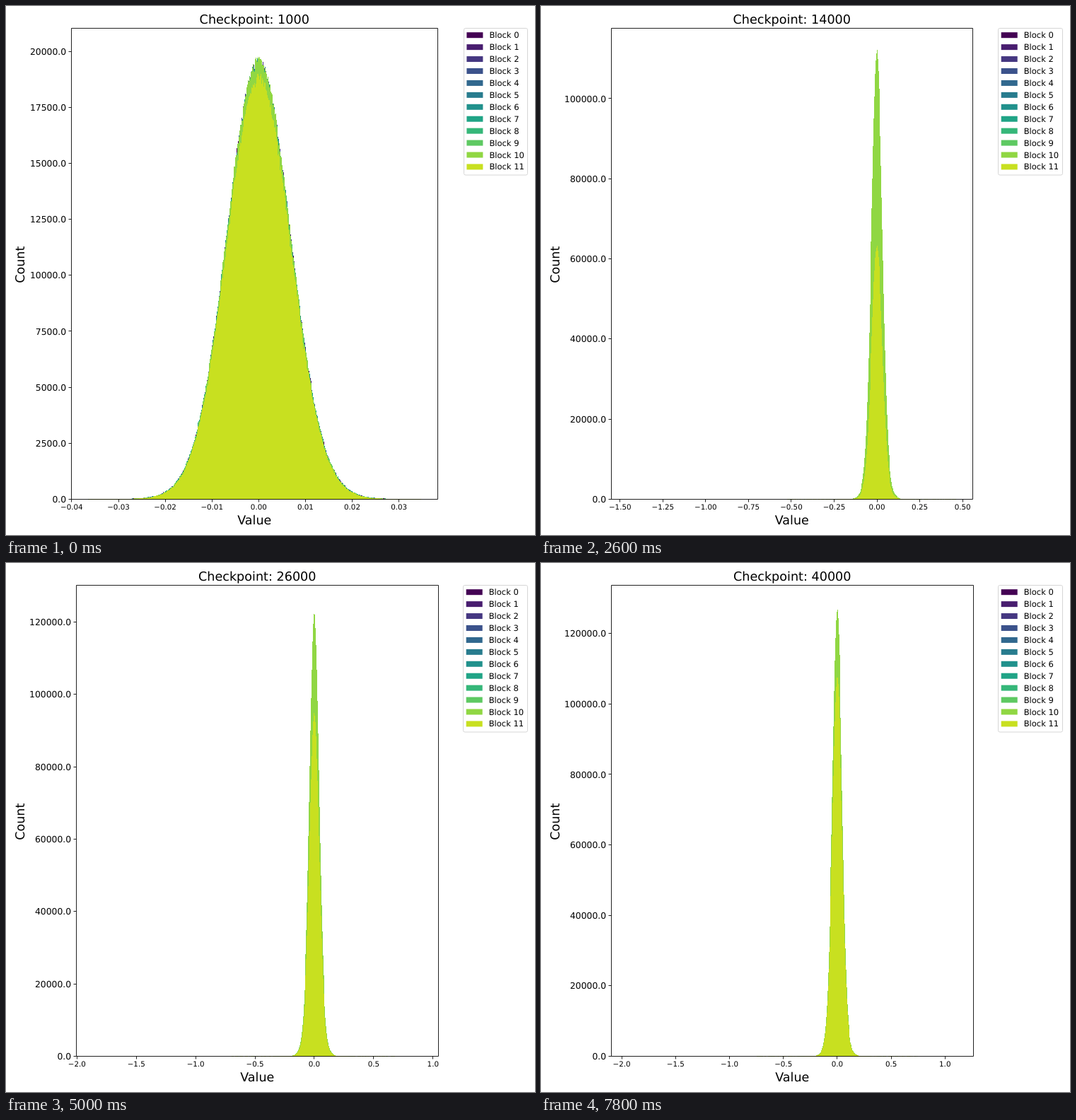
Write an HTML page that moves like this. It is 748x748 px and loops after 8000 ms.

```html
<!DOCTYPE html>
<html lang="en">
<head>
<meta charset="utf-8">
<title>Weight histogram by checkpoint</title>
<style>
  html, body { margin: 0; width: 100%; height: 100%; overflow: hidden; background: #fff; }
  svg { display: block; width: 748px; height: 748px; font-family: "DejaVu Sans", sans-serif; text-rendering: geometricPrecision; }
</style>
</head>
<body>
<svg id="chart" viewBox="0 0 748 748"></svg>
<script>
const STEP_MS = 200, STEPS = 40, BINS = 500, TOP = 31.5, BOTTOM = 697.5;
const SAMPLES = 768 * 3072, TAIL_WIDTH = 1.6, MARGIN = 1.1;
const COLORS = ['#440154', '#481d6f', '#453781', '#3b528b', '#31688e', '#287c8e',
  '#21918c', '#20a486', '#35b779', '#5ec962', '#90d743', '#c8e020'];

// Chart measures at a few checkpoints (in thousands); the rest is interpolated.
const KNOTS = [1, 6, 10, 18, 26, 34, 40];
const CURVES = {
  xMin: [-0.04006, -0.471, -1.139, -1.813, -2.005, -2.113, -2.096],
  xMax: [0.0383, 0.2075, 0.373, 0.742, 1.046, 1.223, 1.264],
  yMax: [21027, 62680, 102540, 125570, 130170, 134560, 133700],
  peak10: [19600, 59300, 97200, 119200, 123500, 127600, 126800],
  peak11: [18750, 31800, 50200, 74500, 95800, 104200, 107600]
};
const EARLY_PEAK = 19350, EARLY_SIGMA = 0.00678;

// Monotone cubic interpolation through the knots.
function interpolate(values, x) {
  const last = KNOTS.length - 1;
  const width = i => KNOTS[i + 1] - KNOTS[i];
  const secant = i => (values[i + 1] - values[i]) / width(i);
  const slope = i => {
    if (i === 0) return ((2 * width(0) + width(1)) * secant(0) - width(0) * secant(1)) / (width(0) + width(1));
    if (i === last) return secant(last - 1);
    const a = secant(i - 1), b = secant(i);
    return a * b <= 0 ? 0 : 2 * a * b / (a + b);
  };
  let i = 0;
  while (i < last - 1 && x >= KNOTS[i + 1]) i++;
  const h = width(i), t = (x - KNOTS[i]) / h, u = 1 - t;
  return values[i] * (1 + 2 * t) * u * u + values[i + 1] * t * t * (3 - 2 * t)
    + h * t * u * (slope(i) * u - slope(i + 1) * t);
}

function randomFrom(seed) {
  let state = seed * 7919 + 17;
  return () => {
    state = state + 0x6D2B79F5 | 0;
    let v = Math.imul(state ^ state >>> 15, 1 | state);
    v = v + Math.imul(v ^ v >>> 7, 61 | v) ^ v;
    return ((v ^ v >>> 14) >>> 0) / 4294967296;
  };
}

function tickStep(range) {
  const raw = range / 9, unit = 10 ** Math.floor(Math.log10(raw));
  return unit * [1, 2, 2.5, 5, 10].find(m => m * unit >= raw);
}

function ticks(min, max) {
  const step = tickStep(max - min), list = [];
  for (let n = Math.ceil(min / step); n * step <= max; n++) list.push(n * step);
  return list;
}

function decimals(step) {
  let d = 1;
  while (Math.abs(step * 10 ** d - Math.round(step * 10 ** d)) > 1e-6) d++;
  return d;
}

const text = (x, y, size, content, anchor = 'middle', extra = '') =>
  `<text x="${x}" y="${y}" font-size="${size}" text-anchor="${anchor}" ${extra}>${content}</text>`;
const line = d => `<path d="${d}" fill="none" stroke="#000" stroke-width="0.87"/>`;
const snap = v => Math.floor(v) + 0.5;

// A bell with a share of wider tail, plus counting noise in every bin.
function histogram(seed, color, peak, sigma, tail, toX, toY, left, right) {
  const random = randomFrom(seed);
  const barWidth = (right - left) / MARGIN / BINS;
  const start = (left + right - barWidth * BINS) / 2;
  const zero = toX(0), spread = toX(sigma) - zero, base = Math.round(BOTTOM);
  let d = `M${Math.round(start)},${base}`;
  for (let i = 0; i < BINS; i++) {
    const z = (start + (i + 0.5) * barWidth - zero) / spread;
    const mean = peak * ((1 - tail) * Math.exp(-z * z / 2)
      + tail * Math.exp(-((z / TAIL_WIDTH) ** 2) / 2));
    const noise = (random() + random() + random() + random() - 2) * 1.73;
    const count = Math.max(0, mean + noise * Math.sqrt(mean));
    d += `V${Math.round(toY(count))}H${Math.round(start + (i + 1) * barWidth)}`;
  }
  return `<path d="${d}V${base}Z" fill="${color}" shape-rendering="crispEdges"/>`;
}

function legend(shift) {
  const left = 646.5 + shift;
  let out = `<rect x="${left}" y="31.5" width="${737.5 - left}" height="207.5" rx="2.3" fill="#fff" stroke="#d6d6d6"/>`;
  COLORS.forEach((color, i) => {
    const y = 45.2 + i * 16.93;
    out += `<rect x="${650.7 + shift * 0.7}" y="${y - 8}" width="23" height="8" fill="${color}"/>`
      + text(682.7 + shift * 0.7, y, 11.5, `Block ${i}`, 'start');
  });
  return out;
}

function draw(k) {
  const v = {};
  for (const name in CURVES) v[name] = interpolate(CURVES[name], k);
  const left = v.yMax >= 1e5 ? 99.5 : 92.5;
  const right = v.yMax >= 1.2e5 ? 611.5 : 610.5;
  const center = (left + right) / 2 - 0.25;
  const range = v.xMax - v.xMin;
  const toX = x => left + (x - v.xMin) / range * (right - left);
  const toY = y => BOTTOM - y / v.yMax * (BOTTOM - TOP);

  // The bars hold a fixed number of samples, so the peak height gives the spread.
  const tail = 0.1 - 0.08 / k;
  const area = SAMPLES * range / MARGIN / BINS / Math.sqrt(2 * Math.PI);
  const lateSigma = area / v.peak10 / (1 + (TAIL_WIDTH - 1) * tail);

  let out = '<rect width="748" height="748" fill="#fff"/>';
  COLORS.forEach((color, i) => {
    const peak = i === 11 ? v.peak11 : i === 10 ? v.peak10 : EARLY_PEAK;
    const sigma = i < 10 ? EARLY_SIGMA : lateSigma;
    out += histogram(k * 12 + i, color, peak, sigma, tail, toX, toY, left, right);
  });

  out += line(`M${left},${TOP}H${right}V${BOTTOM}H${left}Z`);
  const places = decimals(tickStep(range));
  for (const x of ticks(v.xMin, v.xMax)) {
    out += line(`M${snap(toX(x))},${BOTTOM}v4`)
      + text(toX(x), 712.1, 10.3, (x < 0 ? '\u2212' : '') + Math.abs(x).toFixed(places));
  }
  for (const y of ticks(0, v.yMax)) {
    out += line(`M${left},${snap(toY(y))}h-4`)
      + text(left - 7.3, toY(y) + 4.6, 12.4, y.toFixed(1), 'end');
  }
  out += text(center, 25.4, 17.6, `Checkpoint: ${k * 1000}`)
    + text(center, 733, 17.5, 'Value')
    + text(0, 0, 17.5, 'Count', 'middle', 'transform="translate(25.8 365.7) rotate(-90)"')
    + legend(k === 1 ? 1 : 0);
  document.getElementById('chart').innerHTML = out;
}

let shown = 0;
function tick() {
  const k = Math.floor(performance.now() / STEP_MS) % STEPS + 1;
  if (k !== shown) draw(shown = k);
  requestAnimationFrame(tick);
}
tick();
</script>
</body>
</html>
```
